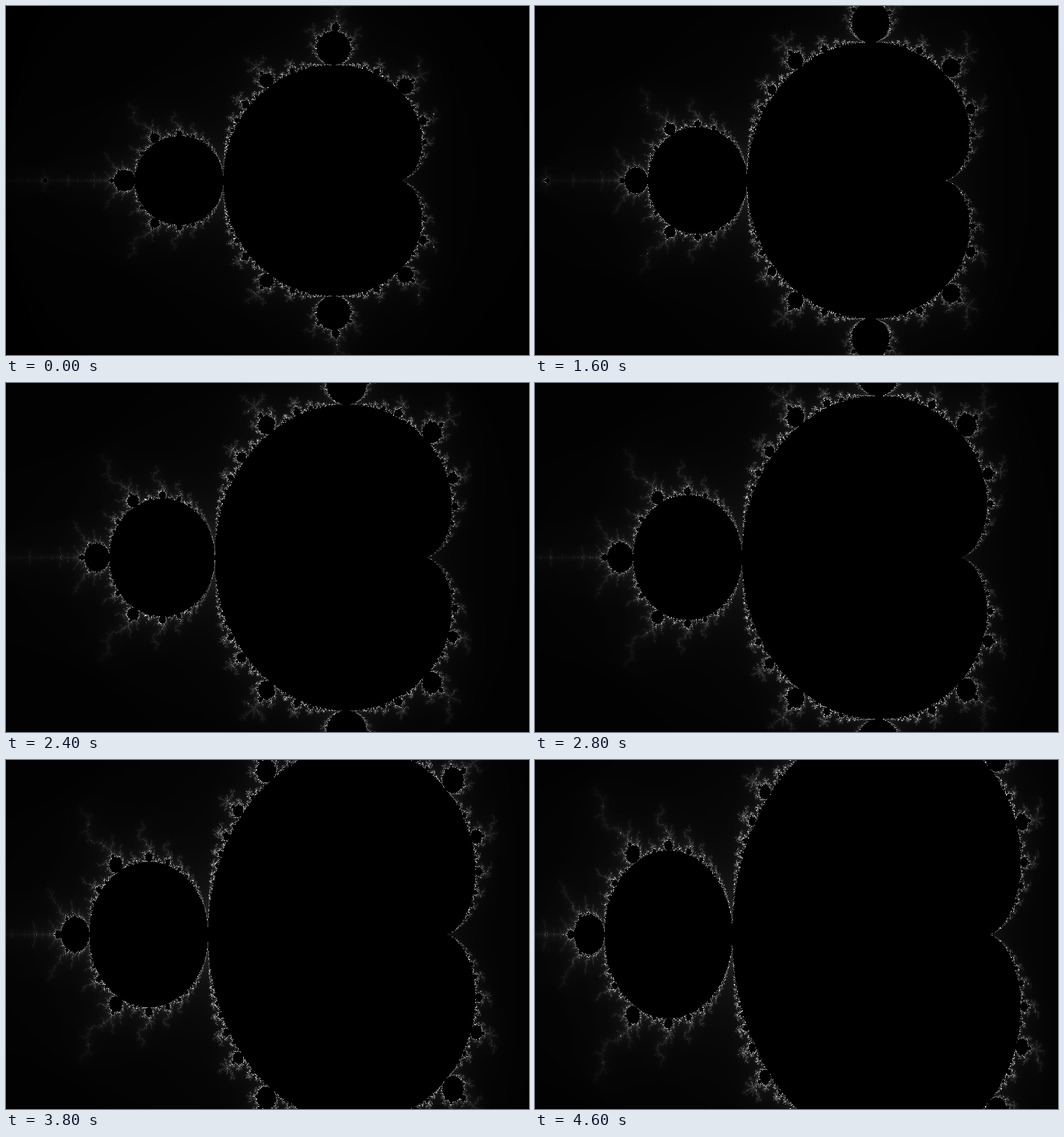
Write an HTML page with a canvas that moves like this. It is 750x500 px and loops after 4800 ms.

```html
<!DOCTYPE html>
<html lang="en">
<head>
<meta charset="utf-8">
<title>Mandelbrot zoom</title>
<style>
  html, body { margin: 0; width: 100%; height: 100%; overflow: hidden; background: #000; }
  canvas { display: block; }
</style>
</head>
<body>
<canvas id="stage" width="750" height="500"></canvas>
<script>
const W = 750, H = 500, STEPS = 24, STEP_MS = 200, MAX_ITER = 255;
const ctx = document.getElementById('stage').getContext('2d');
const image = ctx.createImageData(W, H);
const pixels = new Uint32Array(image.data.buffer);

// The two largest components never escape, so they need no iteration.
function inMainBody(a, b2) {
  const p = a - 0.25, q = p * p + b2;
  return q * (q + p) <= b2 / 4 || (a + 1) * (a + 1) + b2 <= 1 / 16;
}

function escapeTime(a, b) {
  if (inMainBody(a, b * b)) return 0;
  let x = 0, y = 0;
  for (let i = 0; i < MAX_ITER; i++) {
    const t = x * x - y * y + a;
    y = 2 * x * y + b;
    x = t;
    if (x * x + y * y >= 4) return i;
  }
  return 0;
}

// Both half ranges shrink by the same amount, so the aspect changes too.
function draw(step) {
  const halfW = 1.48 - 0.02 * step, halfH = 0.98 - 0.02 * step;
  for (let row = 0; row < H / 2; row++) {
    const b = halfH * (2 * row / (H - 1) - 1);
    for (let col = 0; col < W; col++) {
      const a = -0.5 + halfW * (2 * col / (W - 1) - 1);
      const color = 0xff000000 | escapeTime(a, b) * 0x010101;
      pixels[row * W + col] = pixels[(H - 1 - row) * W + col] = color;
    }
  }
  ctx.putImageData(image, 0, 0);
}

const start = performance.now();
let shown = -1;
function tick() {
  const step = Math.floor((performance.now() - start) / STEP_MS) % STEPS;
  if (step !== shown) draw(shown = step);
  requestAnimationFrame(tick);
}
tick();
</script>
</body>
</html>
```
